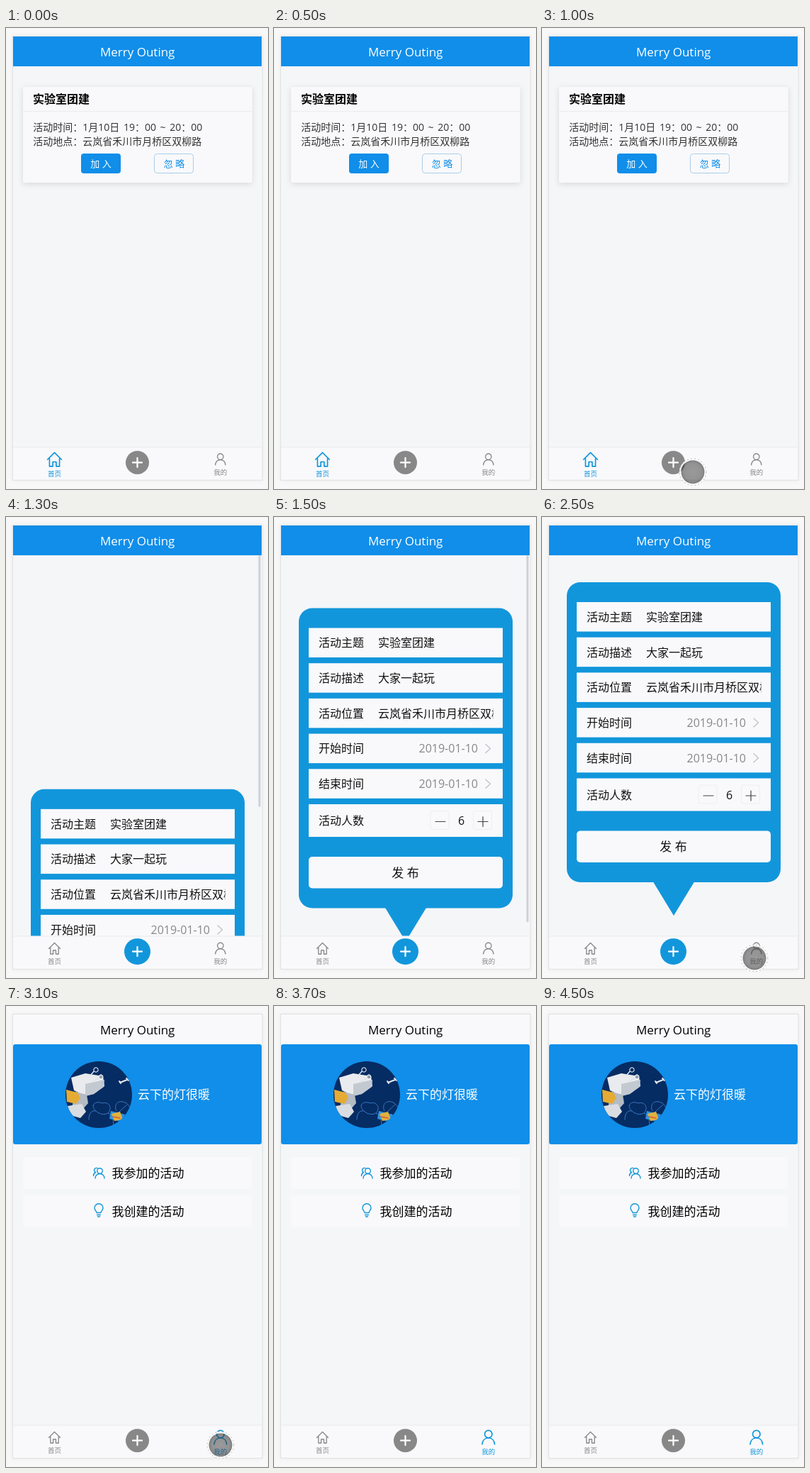
Animation of 370x650 px, one loop 4600 ms. Source, as an HTML page:

```html
<!DOCTYPE html>
<html lang="zh-CN">
<head>
<meta charset="utf-8">
<title>Merry Outing</title>
<style>
  html, body { margin: 0; width: 100%; height: 100%; overflow: hidden; background: #f8f8f8; }
  svg { display: block; width: 370px; height: 650px; }
  text { font-family: "Open Sans", "Noto Sans CJK SC", "Noto Sans CJK", sans-serif; white-space: pre; }
  .line { fill: none; stroke: currentColor; stroke-linecap: round; stroke-linejoin: round; }
</style>
</head>
<body>
<svg id="stage" viewBox="0 0 370 650" xmlns="http://www.w3.org/2000/svg"></svg>
<script>
const LOOP = 4600, STEP = 100;
const FORM_AT = 1200, ME_AT = 2800;
const SLIDE = { from: 570, ms: 500 };
const BLUE = '#108ee9', SKY = '#1296db', PAPER = '#f9f9fb', GREY = '#888';
const TITLE = 'Merry Outing';
const PLACE = '云岚省禾川市月桥区双柳路';
const NICK = '云下的灯很暖';

// Pointer position: time, x, y; each track is one visit.
const VISITS = [
  [[900, 231, 640], [1000, 213, 626], [1100, 194, 617], [1300, 188, 614]],
  [[2400, 296, 630], [2500, 300, 622], [2800, 303, 619], [3400, 303, 619]]
];

// Text is placed by its vertical middle.
const text = (s, x, cy, size, fill, extra = '') =>
  `<text x="${x}" y="${cy + size * 0.37}" font-size="${size}" fill="${fill}" ${extra}>${s}</text>`;
const middle = 'text-anchor="middle"';
const rect = (x, y, w, h, fill, r = 0, extra = '') =>
  `<rect x="${x}" y="${y}" width="${w}" height="${h}" rx="${r}" fill="${fill}" ${extra}/>`;
const line = (d, width = 1.4, extra = '') =>
  `<path class="line" d="${d}" stroke-width="${width}" ${extra}/>`;
const group = (id, body, extra = '') => `<g id="${id}" ${extra}>${body}</g>`;

function homePage() {
  return rect(24, 83, 323.5, 135, PAPER, 3, 'filter="url(#soft)"') +
    rect(24, 117, 323.5, 1, '#ececee') +
    text('实验室团建', 38, 100, 16, '#000', 'font-weight="700"') +
    text('活动时间：1月10日 19：00 ~ 20：00', 38.3, 140, 14, '#333', 'style="word-spacing:2px"') +
    text('活动地点：' + PLACE, 38.3, 160, 14, '#333') +
    rect(106, 177, 56, 28, BLUE, 4) +
    text('加 入', 134, 191, 13, '#fff', middle + ' font-weight="500"') +
    rect(209.5, 177.5, 55, 27, PAPER, 4, 'stroke="#a9cdea"') +
    text('忽 略', 237.5, 191, 13, BLUE, middle);
}

function formPage() {
  const rows = [
    ['活动主题', '实验室团建'], ['活动描述', '大家一起玩'], ['活动位置', PLACE],
    ['开始时间'], ['结束时间'], ['活动人数']
  ];
  const list = rows.map(([label, value], i) => {
    const y = 120 + i * 49.7, h = i === 5 ? 46 : 41.5;
    const cy = y + (i === 5 ? 23.5 : 21);
    let out = rect(49, y, 274, h, PAPER) + text(label, 63, cy, 16, '#111');
    if (value) out += text(value, 147, cy, 16, '#111', 'clip-path="url(#field)"');
    else if (i < 5) {
      out += text('2019-01-10', 288, cy, 16, GREY, 'text-anchor="end"') +
        line(`M299 ${cy - 6}l6.5 6l-6.5 6`, 1.4, 'color="#c2c2c8"');
    } else {
      const box = x => rect(x, cy - 14, 26, 26, PAPER, 3, 'stroke="#eeeef0"');
      out += box(221) + box(281.5) + text('6', 264.5, cy, 16, '#111', middle) +
        line(`M228 ${cy + 1}h14M288 ${cy + 1}h14m-7 -7v14`, 1.2, 'color="#444"');
    }
    return out;
  }).join('');
  return rect(35, 92, 302, 423, SKY, 19) +
    `<path d="M157 514.5H215L186 562Z" fill="${SKY}"/>` + list +
    rect(49, 442.5, 274, 44.5, PAPER, 5) +
    text('发 布', 185.5, 465, 17, '#111', middle);
}

function avatar() {
  const thin = (d, color, w = 1) => line(d, w, `color="${color}"`);
  return `<g clip-path="url(#round)">` +
    rect(84, 78, 94, 94, '#052c63') +
    `<path d="M92 101L112 95L137 99L139 113L124 124L112 127L96 119Z" fill="#e9ebee"/>
     <path d="M112 110L139 104L138 114L124 124L112 127Z" fill="#c3c9d1"/>
     <path d="M98 121L114 125L116 137L108 146L93 143Z" fill="#b4bbc4"/>
     <path d="M85 118L101 122L105 130L99 138L86 135Z" fill="#e5ab35"/>
     <path d="M87 141L107 138L113 149L105 158L91 154Z" fill="#d9dde2"/>` +
    thin('M118 99L126 90M130 104L134 97M122 107L132 101', '#dfe5ec', 1.5) +
    `<circle cx="127" cy="90" r="3.2" fill="#052c63" stroke="#fff"/>
     <circle cx="134" cy="100" r="3" fill="#8fa1b7" stroke="#fff"/>` +
    thin('M161 108L171 104M160 106l2 3M170 102l3 3', '#e4e9f0', 2) +
    thin('M117 160C117 150 122 147 127 148C118 140 126 133 136 137C145 134 151 144 144 151' +
      'C151 155 153 163 151 170M127 148C132 153 139 154 144 151', '#3c77bd') +
    thin('M156 148C151 138 160 131 170 137C178 143 175 151 168 154M160 149l11 -10', '#3c77bd') +
    `<path d="M148 148L168 153L165 164L146 159Z" fill="#2f93df"/>
     <path d="M149 152L161 149L165 160L153 162Z" fill="#e2b13d"/>` +
    thin('M151 156l10 2', '#d35b40', 1.5) + `</g>`;
}

function mePage() {
  const row = (y, s) => rect(24, y, 323.5, 45, PAPER, 2) + text(s, 149.5, y + 23, 17, '#000');
  const icons =
    `<circle class="line" cx="132.5" cy="232.5" r="3.8" stroke-width="1.4"/>` +
    line('M126 243C126 239 129 236.5 132.5 236.5S139 239 139 243') +
    line('M129 228.6A3.2 3.2 0 1 0 126.5 234.5C124.5 235.5 123.5 237 123.5 239.5') +
    line('M128 291.5C127.8 289 125 288 125 284.8A6 6 0 0 1 137 284.8C137 288 134.2 289 134 291.5Z') +
    line('M128.6 294.5h4.8M129.5 297h3');
  return rect(10, 54, 351, 141, BLUE, 3) + avatar() +
    text(NICK, 186, 125, 17, '#fff') +
    row(213, '我参加的活动') + row(267, '我创建的活动') +
    `<g color="${SKY}">${icons}</g>`;
}

const houseIcon = line('M-9.5 0.5L0 -9L9.5 0.5M-6.8 -1V9.8H-2.3V3.6H2.3V9.8H6.8V-1', 1.6);
const userIcon = `<circle class="line" cy="-4.2" r="5" stroke-width="1.6"/>` +
  line('M-8.5 9.5C-8 4 -4.5 1 0 1S8 4 8.5 9.5', 1.6);
const tab = (id, x, label, icon) => group(id,
  `<g class="icon">${icon}</g><text class="label" font-size="9.5" fill="currentColor" ${middle}>${label}</text>`,
  `transform="translate(${x} 608)"`);

const stage = document.getElementById('stage');
stage.innerHTML = `<defs>
  <filter id="soft" x="-10%" y="-20%" width="120%" height="140%">
    <feDropShadow dx="0" dy="2" stdDeviation="4" flood-color="#000" flood-opacity=".12"/></filter>
  <filter id="edge" x="-5%" y="-5%" width="110%" height="110%">
    <feDropShadow dx="0" dy="0" stdDeviation="3" flood-color="#000" flood-opacity=".06"/></filter>
  <clipPath id="view"><rect x="10" y="54" width="351" height="537"/></clipPath>
  <clipPath id="field"><rect x="146" y="0" width="163.5" height="650"/></clipPath>
  <clipPath id="round"><circle cx="131" cy="125" r="47"/></clipPath>
  <radialGradient id="touch"><stop offset="0" stop-color="#333" stop-opacity=".48"/>
    <stop offset=".75" stop-color="#333" stop-opacity=".52"/>
    <stop offset="1" stop-color="#333" stop-opacity=".62"/></radialGradient>
  </defs>` +
  rect(0, 0, 370, 650, '#f8f8f8') +
  rect(9.5, 11.5, 352.5, 626, '#f5f6f8', 0, 'stroke="#dfe2e4" filter="url(#edge)"') +
  rect(10, 12, 351, 42, BLUE, 0, 'id="bar"') +
  text(TITLE, 185.7, 33.5, 17, '#fff', middle + ' id="title"') +
  `<g clip-path="url(#view)">` +
  group('home', homePage()) + group('form', formPage()) + group('me', mePage()) +
  rect(356.5, 54, 3, 517, '#cfd0d6', 1.5, 'id="thumb"') + `</g>` +
  rect(10, 591, 351, 46, PAPER) + rect(10, 590.5, 351, 1, '#ebebee') +
  tab('tabHome', 68.5, '首页', houseIcon) + tab('tabMe', 302.8, '我的', userIcon) +
  `<circle id="add" cx="185.5" cy="612.7"/>` +
  line('M179 612.7h13M185.5 606.2v13', 2.2, 'color="#fff"') +
  group('pointer', `<circle r="18" fill="none" stroke="#fff" stroke-width="2.5" stroke-opacity=".85"/>
    <circle r="18.8" fill="none" stroke="#999" stroke-width=".7" stroke-dasharray="2 3"/>
    <circle r="16.5" fill="url(#touch)"/>`);

const el = id => document.getElementById(id);
const show = (id, on) => el(id).setAttribute('display', on ? 'inline' : 'none');

function setTab(id, on) {
  const node = el(id);
  node.setAttribute('color', on ? SKY : GREY);
  node.querySelector('.icon').setAttribute('transform', `scale(${on ? 1.04 : 0.84})`);
  node.querySelector('.label').setAttribute('y', on ? 23.5 : 21.5);
}

function pointerAt(t) {
  for (const track of VISITS) {
    for (let i = 1; i < track.length; i++) {
      const [t0, x0, y0] = track[i - 1], [t1, x1, y1] = track[i];
      if (t >= t0 && t < t1) {
        const k = (t - t0) / (t1 - t0);
        return [x0 + (x1 - x0) * k, y0 + (y1 - y0) * k];
      }
    }
  }
  return null;
}

function draw(t) {
  const page = t < FORM_AT ? 'home' : t < ME_AT ? 'form' : 'me';
  for (const id of ['home', 'form', 'me']) show(id, id === page);
  el('bar').setAttribute('fill', page === 'me' ? PAPER : BLUE);
  el('title').setAttribute('fill', page === 'me' ? '#000' : '#fff');
  setTab('tabHome', page === 'home');
  setTab('tabMe', page === 'me');
  el('add').setAttribute('r', page === 'form' ? 18.5 : 16.5);
  el('add').setAttribute('fill', page === 'form' ? SKY : GREY);

  const k = Math.min(1, Math.max(0, (t - FORM_AT) / SLIDE.ms));
  const shift = SLIDE.from * (1 - k) ** 3;
  el('form').setAttribute('transform', `translate(0 ${shift})`);
  show('thumb', page === 'form' && shift > 16);
  el('thumb').setAttribute('height', 537 * 537 / (521 + Math.max(16, shift)));

  const at = pointerAt(t);
  show('pointer', !!at);
  if (at) el('pointer').setAttribute('transform', `translate(${at})`);
}

const start = performance.now();
function tick() {
  const t = (performance.now() - start) % LOOP;
  draw(Math.floor(t / STEP) * STEP);
  requestAnimationFrame(tick);
}
tick();
</script>
</body>
</html>
```
